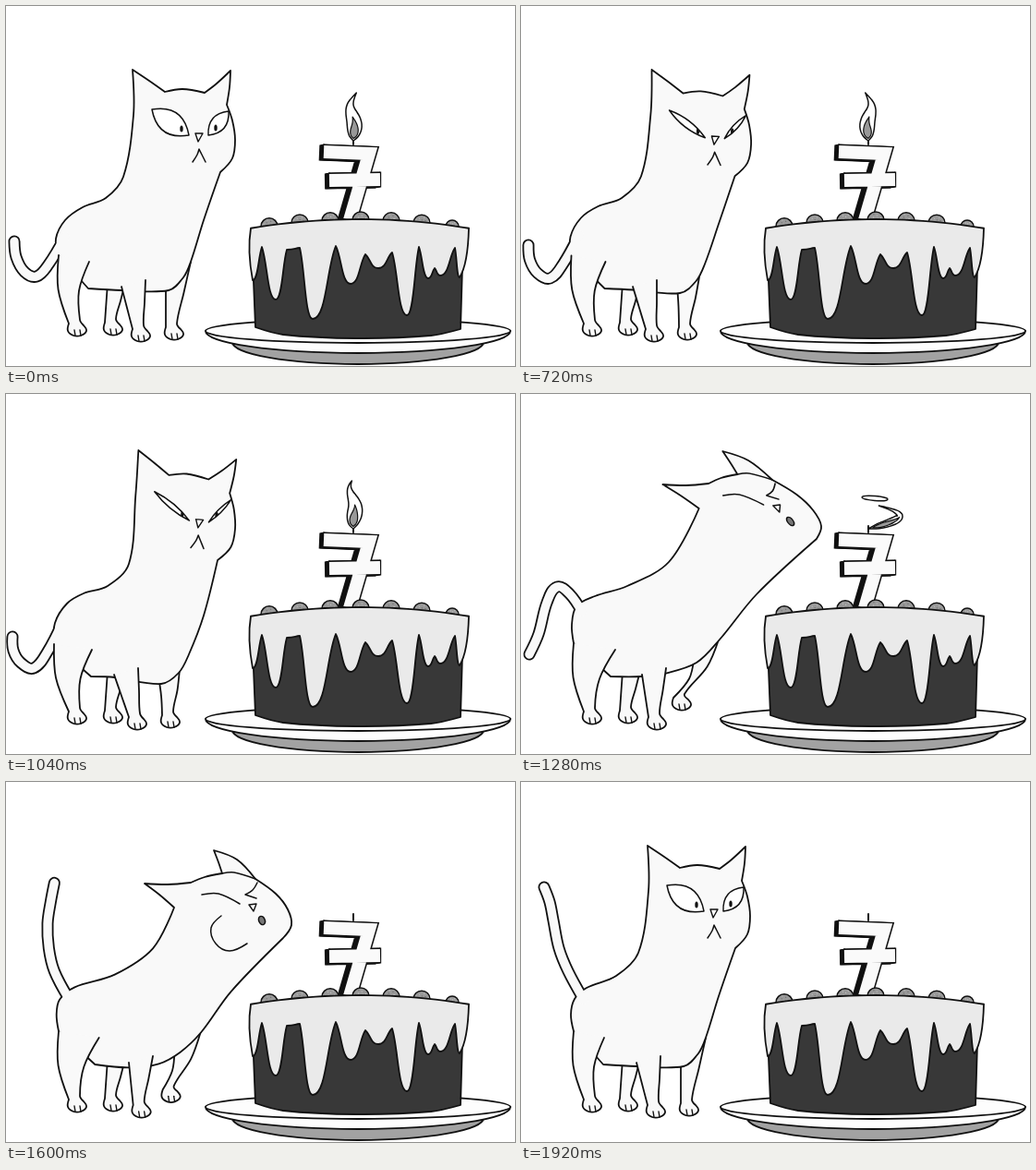
An HTML page with a canvas for the animation above (2410 ms loop, 551x390 px).

```html
<!DOCTYPE html>
<html lang="en">
<head>
<meta charset="utf-8">
<title>Cat and birthday cake</title>
<style>
html, body { margin: 0; width: 100%; height: 100%; overflow: hidden; background: #fff; }
canvas { display: block; }
</style>
</head>
<body>
<canvas id="stage" width="551" height="390"></canvas>
<script>
const ctx = document.getElementById('stage').getContext('2d');
const INK = '#111', FUR = '#f9f9f9', LOOP = 2410, STEP = 80;
const { sin, cos, min, max, PI, hypot } = Math;

// Each run is a flat list x, y, x, y... drawn smoothly; runs meet in corners.
function outline(...runs) {
  const path = new Path2D();
  let last;
  for (const run of runs) {
    const pts = last ? [last] : [];
    for (let i = 0; i < run.length; i += 2) pts.push([run[i], run[i + 1]]);
    if (!last) path.moveTo(...pts[0]);
    const tangent = i => {
      const a = pts[i - 1], b = pts[i + 1];
      if (!a || !b) return [0, 0];
      const d = hypot(b[0] - a[0], b[1] - a[1]) || 1;
      return [(b[0] - a[0]) / d, (b[1] - a[1]) / d];
    };
    for (let i = 1; i < pts.length; i++) {
      const p = pts[i - 1], q = pts[i], t = tangent(i - 1), u = tangent(i);
      const h = hypot(q[0] - p[0], q[1] - p[1]) / 3;
      path.bezierCurveTo(p[0] + t[0] * h, p[1] + t[1] * h, q[0] - u[0] * h, q[1] - u[1] * h, ...q);
    }
    last = pts[pts.length - 1];
  }
  return path;
}

function ink(path, fill, width = 1.8, color = INK) {
  if (fill) { ctx.fillStyle = fill; ctx.fill(path); }
  if (width) { ctx.strokeStyle = color; ctx.lineWidth = width; ctx.stroke(path); }
}

function oval(x, y, rx, ry, fill, width = 0, tilt = 0, end = 2 * PI) {
  const path = new Path2D();
  path.ellipse(x, y, rx, ry, tilt, 0, end);
  ink(path, fill, width);
}

const mix = (a, b, k) => typeof a === 'number' ? a + (b - a) * k
  : Array.isArray(a) ? a.map((v, i) => mix(v, b[i], k))
  : Object.fromEntries(Object.keys(a).map(n => [n, mix(a[n], b[n], k)]));

function at(keys, s) {
  let i = 0;
  while (i < keys.length - 2 && s >= keys[i + 1][0]) i++;
  const [s0, a] = keys[i], [s1, b] = keys[i + 1];
  return mix(a, b, min(1, max(0, (s - s0) / (s1 - s0))));
}

// ---- Cat ----
// legs: shoulder x, thigh x, near front foot x
// far: far front leg as left top, right top, foot, bend
const sit = {
  back: [57, 270, 54, 252, 64, 232, 83, 218, 108, 208, 127, 185],
  chest: [214, 232, 200, 277, 192, 294, 176, 308, 125, 308, 89, 306],
  tail: [64, 250, 46, 280, 33, 293, 20, 288, 11, 272, 9, 255],
  legs: [125, 90, 136],
  far: [173, 300, 200, 277, 172, 361, 0]
};
const brace = {
  back: [52, 271, 53, 248, 66, 227, 84, 216, 110, 208, 133, 184],
  chest: [214, 240, 198, 282, 187, 302, 168, 314, 118, 307, 92, 306],
  tail: [62, 246, 45, 279, 30, 297, 16, 291, 8, 278, 7, 263],
  legs: [117, 93, 132],
  far: [165, 306, 188, 298, 168, 361, 1]
};
const lunge = {
  back: [57, 270, 55, 250, 60, 230, 80, 219, 115, 208, 160, 182],
  chest: [255, 217, 215, 266, 190, 291, 155, 303, 131, 306, 97, 306],
  tail: [66, 236, 53, 217, 39, 209, 28, 226, 19, 260, 9, 282],
  legs: [131, 102, 137],
  far: [187, 288, 214, 266, 164, 342, 6]
};
const blow = {
  back: [57, 270, 55, 252, 58, 236, 76, 222, 125, 208, 175, 178],
  chest: [258, 225, 217, 268, 187, 292, 160, 304, 137, 310, 100, 306],
  tail: [68, 234, 53, 205, 49, 180, 50, 155, 57, 130, 66, 107],
  legs: [137, 106, 137],
  far: [187, 288, 216, 268, 167, 339, 6]
};
const rest = {
  ...sit,
  back: [57, 270, 54, 252, 58, 235, 71, 223, 103, 210, 127, 185],
  tail: [68, 236, 51, 205, 41, 180, 35, 150, 31, 130, 25, 114]
};
const poses = [[0, sit], [7, sit], [11, brace], [14, brace], [16, lunge], [18, blow], [19, blow], [22, rest]];

const front = {
  pivot: [137, 69],
  runs: [[137, 69], [155, 81, 172, 93], [191, 90, 215, 94], [228, 84, 243, 70], [242, 88, 239, 107],
    [245, 124, 248, 145, 245, 165, 232, 180]],
  nape: [138, 118, 137, 69]
};
const profile = {
  pivot: [337, 147],
  runs: [[210, 128], [194, 114, 178, 102], [203, 103, 228, 101], [243, 95, 262, 91], [258, 79, 253, 66],
    [278, 76, 298, 97], [320, 113, 333, 130, 337, 147, 328, 161]],
  nape: [210, 128]
};

// Head placement: shift x, shift y, lean, tilt about the pivot.
const still = [0, 0, 0, 0];
const headMoves = [[0, still], [7, still], [11, [9, 0, .09, .09]], [14, [5, -12, .08, .08]],
  [15, [-57, 2, -.25, 0]], [16, [-12, -4, -.28, 0]], [18, still], [19, still], [20, [-28, 8, 0, 0]],
  [21, [24, 4, -.1, -.1]], [22, [6, 10, -.09, -.09]], [24, still]];
const lids = [[0, [1]], [5, [.4]], [7, [.4]], [11, [.24]], [14, [.24]], [21, [1]]];

function drawLeg(lx, ly, rx, ry, x, y, bend) {
  const heel = [x + 1, y - 13], shin = [x + 13, y - 17];
  ink(outline([lx, ly, (lx + heel[0]) / 2 + bend, (ly + heel[1]) / 2, ...heel],
    [x, y - 5, x + 6, y, x + 14, y, x + 20, y - 5, x + 17, y - 11],
    [...shin, (rx + shin[0]) / 2 + bend, (ry + shin[1]) / 2, rx, ry]), FUR);
  for (const toe of [x + 8, x + 14]) ink(outline([toe, y, toe - 1, y - 6]), null, 1.4);
}

function drawEye(x0, y0, x1, y1, bulge, px, py) {
  const mx = (x0 + x1) / 2, my = (y0 + y1) / 2, d = hypot(x1 - x0, y1 - y0);
  const nx = (y1 - y0) / d * bulge * 2, ny = (x0 - x1) / d * bulge * 2;
  const lid = new Path2D();
  lid.moveTo(x0, y0);
  lid.quadraticCurveTo(mx + nx, my + ny, x1, y1);
  lid.quadraticCurveTo(mx - nx, my - ny, x0, y0);
  ink(lid, '#fff', 1.5);
  ctx.save();
  ctx.clip(lid);
  oval(px, py, 1.7, 3.5, INK);
  ctx.restore();
}

function drawOpenFace(open) {
  drawEye(158, 112, 198, 140, 12 * open, 190, 133);
  drawEye(241, 114, 219, 140, 8 * open, 227, 132);
  ink(outline([205, 138], [213, 138], [208, 147], [205, 138]), '#fff', 1.4);
  ink(outline([202, 169, 207, 161, 209, 155], [212, 161, 216, 169]), null, 1.5);
}

function drawShutFace(puffed) {
  ink(outline([262, 91, 275, 90, 298, 97]), null, 1.4);
  ink(outline([240, 114, 258, 113, 281, 124]), null, 1.5);
  ink(outline([300, 101, 295, 109, 287, 114], [299, 118]), null, 1.5);
  ink(outline([291, 125], [299, 124], [296, 132], [291, 125]), '#fff', 1.4);
  if (puffed) ink(outline([261, 137, 250, 150, 255, 167, 270, 175, 289, 167]), null, 1.5);
  oval(305, 142, 3.3, 4.8, '#777', 1.5, -.4);
}

function drawCat(s) {
  const { back, chest, tail, legs: [shoulder, thigh, foot], far } = at(poses, s);
  const shut = s >= 15 && s <= 20, head = shut ? profile : front;
  const [dx, dy, lean, tilt] = at(headMoves, s), [px, py] = head.pivot;
  const place = run => run.map((v, i) => i % 2
    ? v + dy + tilt * (run[i - 1] - px)
    : v + dx - lean * (run[i + 1] - py));

  // The tail's ink lies under the body and its fur above, so the root stays open.
  const tailPath = outline(tail);
  ink(tailPath, null, 13);
  drawLeg(110, 300, 129, 300, 106, 356, 0);
  drawLeg(...far);
  ink(outline(...head.runs.map(place), chest, back.slice(0, 2), [...back.slice(2), ...place(head.nape)]), FUR);
  ink(tailPath, null, 9.4, FUR);
  drawLeg(back[0], back[1], thigh, 277, 67, 357, -6);
  drawLeg(shoulder, 304, shoulder + 26, 297, foot, 363, 0);

  ctx.save();
  ctx.transform(1, tilt, -lean, 1, dx + lean * py, dy - tilt * px);
  if (shut) drawShutFace(s > 16); else drawOpenFace(at(lids, s)[0]);
  ctx.restore();
}

// ---- Cake ----
const frostTop = x => 231 + .0007 * (x - 383) ** 2;

function drawBerry(x, y, r) {
  oval(x, y, r, r, '#999', 1.5);
  for (let i = 1; i < 15; i++) {
    const d = Math.sqrt(i / 15) * (r - 1.5), a = i * 2.4 + x;
    oval(x + d * cos(a), y + d * sin(a), .6, .6, i % 3 ? '#c4c4c4' : '#666');
  }
}

function drawSeven() {
  const seven = new Path2D('M344 158L393 160L372 232M350 189L405 188');
  ctx.save();
  ctx.lineJoin = 'miter';
  ctx.lineCap = 'butt';
  for (let d = 5; d >= 0; d--) {
    ctx.setTransform(1, 0, 0, 1, -d, d / 5);
    ink(seven, null, 17);
  }
  ink(new Path2D('M342.8 158H345M348.8 189H351M404 188H406.2'), null, 17);
  ink(seven, null, 14, '#fafafa');
  ctx.restore();
  ink(outline([376, 150, 376, 143]), null, 2);
}

// Frosting edge: alternating peaks and rounded drips from left to right.
const drips = [[267, 297], [277, 261], [292, 318], [304, 264], [318, 262], [332, 339], [357, 260], [373, 301],
  [389, 269], [403, 284], [418, 267], [434, 335], [447, 261], [457, 295], [464, 284], [470, 292], [486, 262], [491, 294]];

function drawFrosting() {
  const path = new Path2D();
  path.moveTo(265, frostTop(265));
  path.quadraticCurveTo(261, 265, ...drips[0]);
  for (let i = 1; i < drips.length; i++) {
    const [x0, y0] = drips[i - 1], [x1, y1] = drips[i];
    const falls = y1 > y0, dx = x1 - x0, dy = y1 - y0;
    if (falls) path.bezierCurveTo(x0 + dx * .4, y0 + dy * .3, x0 + dx * .4, y1, x1, y1);
    else path.bezierCurveTo(x0 + dx * .6, y0, x0 + dx * .6, y1 - dy * .3, x1, y1);
  }
  path.quadraticCurveTo(500, 280, 501, frostTop(501));
  for (let x = 495; x > 265; x -= 10) path.lineTo(x, frostTop(x));
  path.closePath();
  ink(path, '#eaeaea');
}

function drawCake() {
  oval(381, 364, 136, 24, '#a2a2a2', 1.8);
  oval(381, 352, 165, 24, '#fdfdfd', 1.8, 0, PI);
  oval(381, 352, 165, 13, '#fdfdfd', 1.8);
  drawSeven();
  for (let i = 0; i < 7; i++) {
    const x = 285 + 33 * i;
    drawBerry(x, frostTop(x) + 1, i === 6 ? 7 : 9);
  }
  ink(outline([266, 250], [270, 348], [300, 356, 380, 360, 460, 357, 492, 350], [495, 250]), '#383838');
  drawFrosting();
}

// A flame tongue follows a swaying spine that a gust bends over and carries off.
function drawFlame(s) {
  const gust = max(0, (s - 14) / 2), bend = min(1, gust), drift = max(0, gust - 1) * 200;
  if (gust > 1.5) return;
  const spine = u => [
    376 + drift + 5 * (1 - bend) * u * sin(7 * u - s * PI / 3) + 34 * bend * sin(2.8 * u),
    146 - (52 - 27 * bend) * u];
  const tongue = (low, high, wide) => {
    const left = [], right = [];
    for (let i = 0; i <= 12; i++) {
      const v = i / 12, u = low + v * (high - low);
      const [x, y] = spine(u), [x2, y2] = spine(u + .01), d = hypot(x2 - x, y2 - y);
      const w = wide * (1 - .5 * bend) * sin(PI * v ** .75) * (1.15 - .6 * v);
      left.push(x + (y2 - y) / d * w, y - (x2 - x) / d * w);
      right.unshift(x - (y2 - y) / d * w, y + (x2 - x) / d * w);
    }
    return outline(left, right);
  };
  ink(tongue(0, 1, 8.5), '#fff', 1.5);
  ink(tongue(.05, .5, 4.5), '#999', 1.2);
  if (gust >= 1) oval(383 + drift, 113, 14, 2.5, '#fff', 1.3, .08);
}

function draw(time) {
  const s = min(24, Math.floor(time % LOOP / STEP));
  ctx.fillStyle = '#fff';
  ctx.fillRect(0, 0, 551, 390);
  ctx.lineJoin = ctx.lineCap = 'round';
  drawCake();
  drawFlame(s);
  drawCat(s);
}

let start;
function tick(now) {
  start ??= now;
  draw(now - start);
  requestAnimationFrame(tick);
}
requestAnimationFrame(tick);
</script>
</body>
</html>
```
